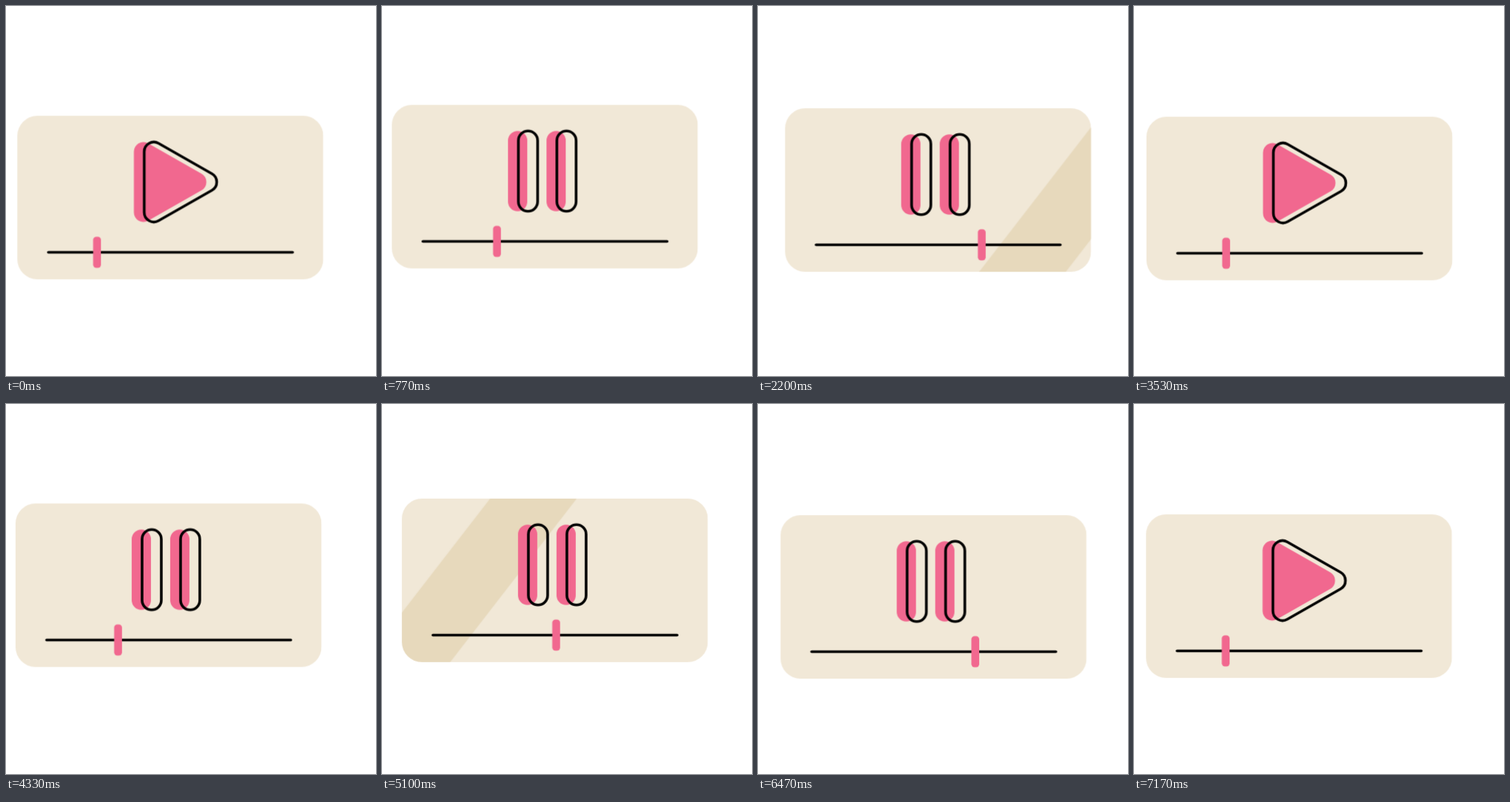
These frames come from a looping animation (500x500 px, 7.21 s). An HTML page:

```html
<!DOCTYPE html>
<html lang="en">
<head>
<meta charset="utf-8">
<title>Media player</title>
<style>
  :root { --cycle: 3605ms; --half: 1802.5ms; }
  html, body { margin: 0; width: 100%; height: 100%; overflow: hidden; background: #fff; }
  svg { display: block; width: 100vw; height: 100vh; }

  /* Two sine swings a quarter turn apart make the card circle. */
  .sway, .bob {
    animation: sway var(--half) cubic-bezier(.3642, 0, .6358, 1) -3135ms infinite alternate;
  }
  .bob { animation-name: bob; animation-delay: -2235ms; }
  @keyframes sway { from { transform: translateX(-12.5px); } to { transform: translateX(12.5px); } }
  @keyframes bob { from { transform: translateY(-12.2px); } to { transform: translateY(12.2px); } }

  .card { fill: #f1e8d7; }
  .sheen { fill: #e7d9bc; animation: sheen var(--cycle) linear infinite; }
  @keyframes sheen {
    0%, 25% { transform: translateX(-267.6px); }
    72.22%, 100% { transform: translateX(490.6px); }
  }

  .knob { fill: #f1688f; animation: seek var(--cycle) cubic-bezier(.333, 0, .667, 1) infinite; }
  @keyframes seek {
    0%, 97.2%, 100% { transform: translateX(0); }
    75% { transform: translateX(174px); }
  }

  .play { animation: play var(--cycle) step-end infinite; }
  .pause { animation: pause var(--cycle) step-end infinite; }
  @keyframes play { 0%, 83.33% { opacity: 1; } 16.67% { opacity: 0; } }
  @keyframes pause { 0%, 83.33% { opacity: 0; } 16.67% { opacity: 1; } }

  .ink { fill: #f1688f; }
  .line { fill: none; stroke: #000; stroke-width: 3.6; stroke-linecap: round; }
</style>
</head>
<body>
<svg viewBox="0 0 500 500">
  <defs>
    <clipPath id="cardClip"><rect width="413.5" height="221" rx="27"/></clipPath>
    <path id="triangle" d="M171.5 48.5A13 13 0 0 1 190.9 37.2L262.9 78.2A13 13 0 0 1 262.9 100.8L190.9 141.8A13 13 0 0 1 171.5 130.5Z"/>
    <rect id="bar" x="171" y="35.2" width="26" height="108.6" rx="13"/>
  </defs>
  <g transform="translate(24.1 139.7)">
    <g class="sway"><g class="bob">
      <g clip-path="url(#cardClip)">
        <rect class="card" width="413.5" height="221"/>
        <path class="sheen" d="M122 0H239L68 221H-49Z"/>
      </g>
      <g class="play">
        <use class="ink" href="#triangle" x="-14"/>
        <use class="line" href="#triangle"/>
      </g>
      <g class="pause">
        <use class="ink" href="#bar" x="-14"/>
        <use class="ink" href="#bar" x="38"/>
        <use class="line" href="#bar"/>
        <use class="line" href="#bar" x="52"/>
      </g>
      <path class="line" d="M42 184.5H372"/>
      <rect class="knob" x="102.4" y="163.5" width="10.6" height="42" rx="4.2"/>
    </g></g>
  </g>
</svg>
</body>
</html>
```
